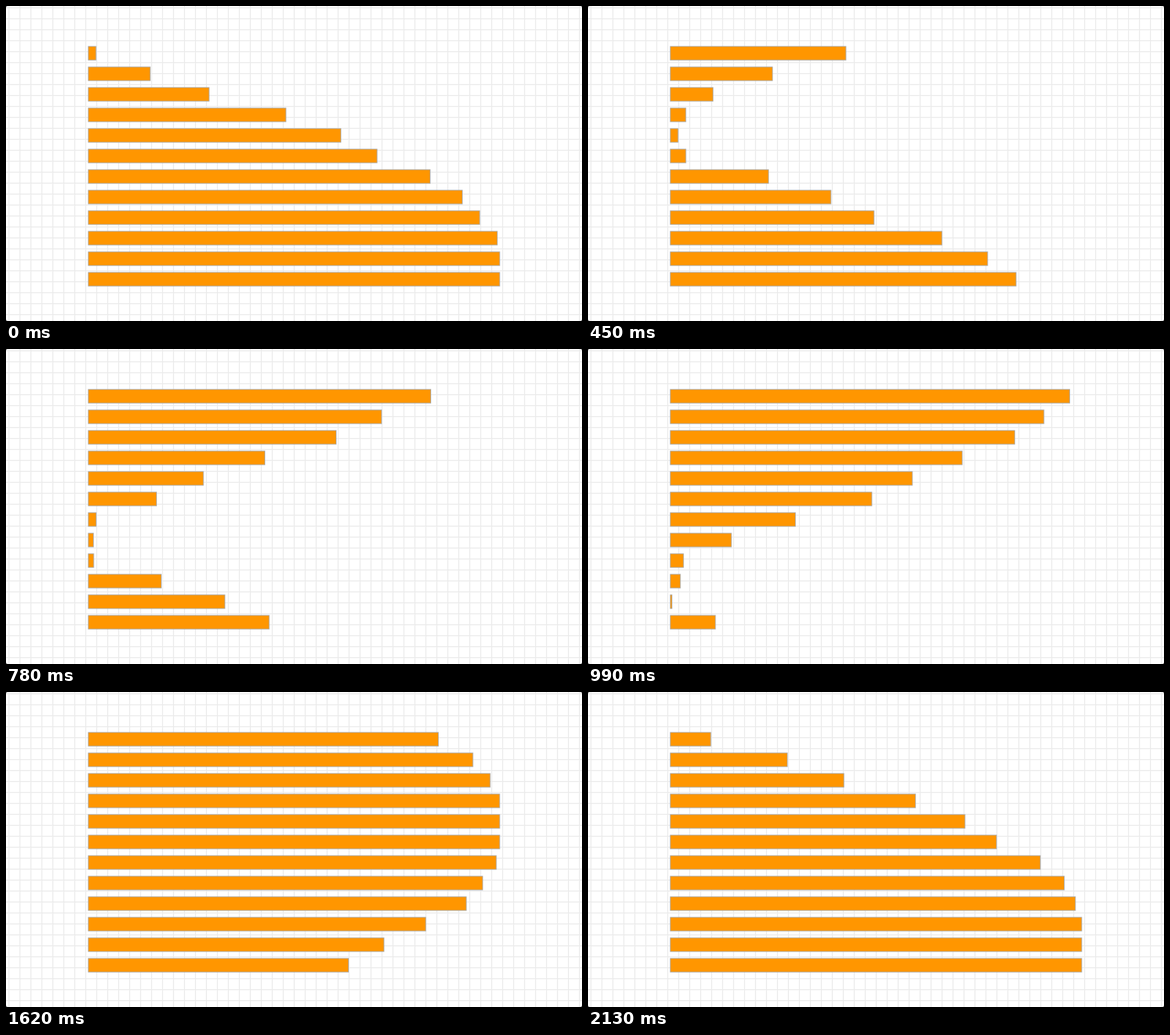
An HTML page with a canvas that plays this animation: 840 by 460 pixels, repeating every 2190 ms.

```html
<!DOCTYPE html>
<html lang="en">
<head>
<meta charset="utf-8">
<title>Sliding bars</title>
<style>
  html, body { margin: 0; width: 840px; height: 460px; overflow: hidden; background: #555; }
  canvas { display: block; border-radius: 3px; }
</style>
</head>
<body>
<canvas id="stage" width="840" height="460"></canvas>
<script>
const ctx = document.getElementById('stage').getContext('2d');
const LOOP = 2190, STEP = 30, LAST = 2130;
const BARS = 12, LEFT = 120, TOP = 59, PITCH = 30, THICK = 20, FULL = 600;

// One cycle: rest closed, open for a quarter turn, rest open, close for a quarter turn.
const REST = .338, QUARTER = Math.PI / 2, CYCLE = 2 * (QUARTER + REST);

// Elapsed ms against phase: the pace picks up towards the end.
const pace = [[0, 0], [990, 1.628], [1320, 2.236], [1890, 3.233], [LAST, 3.68]];

function phaseAt(time) {
  const i = Math.max(1, pace.findIndex(([t]) => time <= t));
  const [t0, p0] = pace[i - 1], [t1, p1] = pace[i];
  return p0 + (p1 - p0) * (time - t0) / (t1 - t0);
}

// Even stagger; every third bar and the topmost ones run slightly ahead.
function lag(k) {
  const ahead = (k % 3 === 2 ? .043 : 0) + .03 * Math.max(0, 2 - k);
  return .021 + .16 * k - ahead;
}

// A low hop, then a higher one.
function rebound(p) {
  const split = .35;
  return p < split
    ? 13 * Math.sin(Math.PI * p / split)
    : 23 * Math.sin(Math.PI * (p - split) / (1 - split));
}

function barWidth(k, phase) {
  const u = (phase - lag(k) + CYCLE) % CYCLE;
  if (u < REST) return rebound(u / REST);
  return FULL * Math.sin(Math.min(u - REST, CYCLE - u, QUARTER));
}

function drawLines(offset, color) {
  ctx.fillStyle = color;
  for (let x = 4 - offset; x < 840; x += 16) ctx.fillRect(x, 0, 1, 460);
  for (let y = 2 + offset; y < 460; y += 16) ctx.fillRect(0, y, 840, 1);
}

function drawGrid() {
  ctx.fillStyle = '#fff';
  ctx.fillRect(0, 0, 840, 460);
  drawLines(1, '#f8f8f8');
  drawLines(0, '#eaeaea');
}

function drawBar(k, width) {
  if (width < 1) return;
  const box = [LEFT, TOP + PITCH * k, width, THICK];
  ctx.fillStyle = '#ff9600';
  ctx.fillRect(...box);
  ctx.strokeStyle = '#aaa';
  ctx.strokeRect(...box);
}

const start = performance.now();

function draw() {
  const elapsed = (performance.now() - start) % LOOP;
  const time = Math.min(LAST, Math.floor(elapsed / STEP) * STEP);
  const phase = phaseAt(time);
  drawGrid();
  for (let k = 0; k < BARS; k++) drawBar(k, barWidth(k, phase));
  requestAnimationFrame(draw);
}
draw();
</script>
</body>
</html>
```
